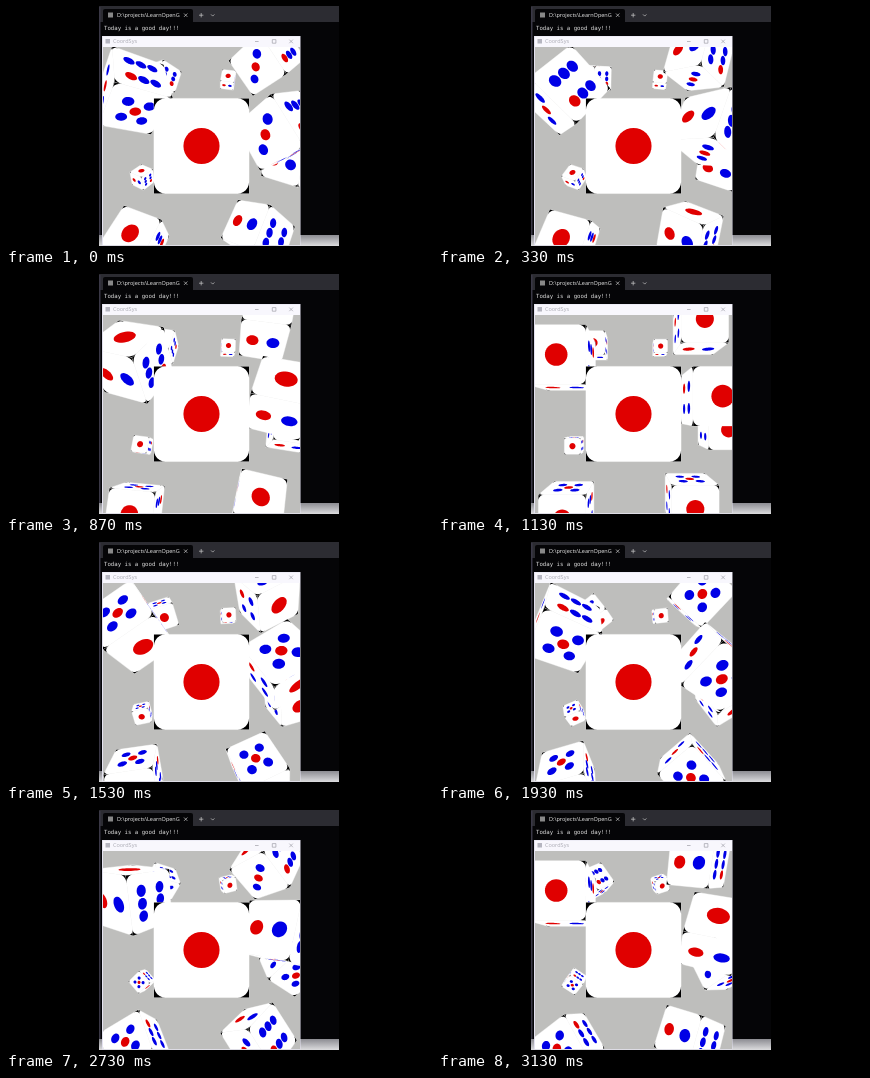
Write an HTML page with a canvas that moves like this. It is 426 px wide and 240 px high and loops after 3190 ms.

```html
<!DOCTYPE html>
<html lang="en">
<head>
<meta charset="utf-8">
<title>Rotating dice</title>
<style>
html, body { margin: 0; width: 100%; height: 100%; overflow: hidden; background: #000; }
svg, canvas { position: absolute; display: block; }
svg { left: 0; top: 0; }
canvas { left: 97px; top: 41px; }
text { font: 5.5px "Open Sans", sans-serif; }
.term { font: 5.7px "DejaVu Sans Mono", monospace; }
.line { fill: none; stroke-width: .7; }
</style>
</head>
<body>
<svg width="426" height="240" viewBox="0 0 426 240">
  <linearGradient id="bar" x2="0" y2="1">
    <stop stop-color="#8c8c92"/><stop offset="1" stop-color="#dcdcde"/>
  </linearGradient>
  <rect x="93" width="240" height="240" fill="#050507"/>
  <rect x="93" width="240" height="16" fill="#2c2c32"/>
  <path d="M97 16V5q0-2 2-2h86q2 0 2 2v11z" fill="#050507"/>
  <rect x="93" y="1" width="1.5" height="228" fill="#3a3846"/>
  <rect x="102" y="6.5" width="5" height="5" fill="#888"/>
  <text x="111" y="11.4" fill="#eee">D:\projects\LearnOpenG</text>
  <path class="line" stroke="#ccc" d="M178 7.5l3.4 3.4m0-3.4l-3.4 3.4M193 9.2h4.4m-2.2-2.2v4.4M205 8.4l1.7 1.7 1.7-1.7"/>
  <text class="term" x="98" y="23.8" fill="#ddd">Today is a good day!!!</text>
  <rect x="93" y="229" width="240" height="11" fill="url(#bar)"/>
  <rect x="96" y="30" width="198.5" height="209.5" fill="#e4e2f0"/>
  <rect x="97" y="30.5" width="197" height="11" fill="#f8f7fd"/>
  <rect x="99.5" y="33" width="4.5" height="4.5" fill="#b5b5c0"/>
  <text x="107" y="37.4" fill="#a9a9b2">CoordSys</text>
  <path class="line" stroke="#a0a0a8" d="M249 35.5h3.6M266.3 33.6h3.6v3.6h-3.6zM283.3 33.6l3.6 3.6m0-3.6l-3.6 3.6"/>
</svg>
<canvas id="view" width="197" height="198"></canvas>
<script>
const view = document.getElementById("view"), ctx = view.getContext("2d");
const CX = view.width / 2, CY = view.height / 2, EYE = 3;
const FOCAL = CX / Math.tan(Math.PI / 8);   // 45 degree field of view
const RED = "#e00000", BLUE = "#0000e6";
const LOOP = 3190, FPS = 15, ALIGNED = 17;  // all dice face front at step 17
const CORNER = .12;

const neg = v => v.map(c => -c);
const dot = (a, b) => a.reduce((sum, c, i) => sum + c * b[i], 0);
const X = [1, 0, 0], Y = [0, 1, 0], Z = [0, 0, 1], BACK = neg(Z);

// Pip layouts; the first pip of each face is red
const grid = (us, vs) => us.flatMap(u => vs.map(v => [u, v]));
const middle = [[0, 0]], corners = grid([1, -1], [1, -1]);
const face = (normal, u, v, pips, step = .2, radius = .1) => ({ normal, u, v, pips, step, radius });
const faces = [
  face(Z, X, Y, middle, 0, .19),
  face(neg(Y), X, BACK, grid([-1, 1], [0]), .225, .135),
  face(BACK, X, Y, [...middle, ...corners.filter(([u, v]) => u !== v)]),
  face(neg(X), Y, BACK, corners),
  face(Y, X, BACK, [...middle, ...corners], .19),
  face(X, Y, BACK, grid([1, -1], [1, 0, -1]), .22)
];

const cubes = [
  [0, 0, 0], [2, 5, -15], [-1.5, -2.2, -2.5], [-3.8, -2, -12.3], [2.4, -.4, -3.5],
  [-1.7, 3, -7.5], [1.3, -2, -2.5], [1.5, 2, -2.5], [1.5, .3, -1.5], [-1.3, 1, -1.5]
].map((pos, i) => ({ pos, speed: i * Math.PI / 9 }))
 .sort((a, b) => a.pos[2] - b.pos[2]);

const axis = [1, .3, .5].map(c => c / Math.hypot(1, .3, .5));

function rotate(v, angle) {
  const c = Math.cos(angle), s = Math.sin(angle), k = dot(axis, v) * (1 - c);
  return v.map((p, i) => {
    const j = (i + 1) % 3, l = (i + 2) % 3;
    return p * c + (axis[j] * v[l] - axis[l] * v[j]) * s + axis[i] * k;
  });
}

function arc(u, v, r, from, sweep, steps) {
  return Array.from({ length: steps + 1 }, (_, i) => {
    const a = from + sweep * i / steps;
    return [u + r * Math.cos(a), v + r * Math.sin(a)];
  });
}

function drawFace(pos, angle, { normal, u, v, pips, step, radius }) {
  const [n, du, dv] = [normal, u, v].map(d => rotate(d, angle));
  const centre = pos.map((p, i) => p + n[i] / 2);
  if (dot(n, [-centre[0], -centre[1], EYE - centre[2]]) <= 0) return;

  const fill = (points, color) => {
    ctx.beginPath();
    for (const [a, b] of points) {
      const [x, y, z] = centre.map((c, i) => c + du[i] * a + dv[i] * b);
      const scale = FOCAL / (EYE - z);
      ctx.lineTo(CX + x * scale, CY - y * scale);
    }
    ctx.closePath();
    ctx.fillStyle = color;
    ctx.fill();
  };

  // Four points on a circle through the corners make the square
  fill(arc(0, 0, Math.SQRT1_2, Math.PI / 4, Math.PI * 2, 4), "#fff");
  ctx.strokeStyle = "#fff";
  ctx.lineWidth = .4;
  ctx.stroke();
  for (let q = 0; q < 4; q++) {
    const from = q * Math.PI / 2, mid = from + Math.PI / 4;
    const su = Math.sign(Math.cos(mid)), sv = Math.sign(Math.sin(mid)), inset = .5 - CORNER;
    fill([[su / 2, sv / 2], ...arc(su * inset, sv * inset, CORNER, from, Math.PI / 2, 6)], "#000");
  }
  pips.forEach(([a, b], i) =>
    fill(arc(a * step, b * step, radius, 0, Math.PI * 2, 32), i ? BLUE : RED));
}

function draw(now) {
  // Steps of 1/15 s, rounded to hundredths of a second
  const step = Math.floor((Math.floor(now % LOOP / 10) * 3 + 1) / 20);
  const seconds = (step - ALIGNED) / FPS;
  ctx.fillStyle = "#bebebc";
  ctx.fillRect(0, 0, view.width, view.height);
  for (const { pos, speed } of cubes)
    for (const side of faces) drawFace(pos, speed * seconds, side);
}

const start = performance.now();
function tick() {
  draw(performance.now() - start);
  requestAnimationFrame(tick);
}
tick();
</script>
</body>
</html>
```
